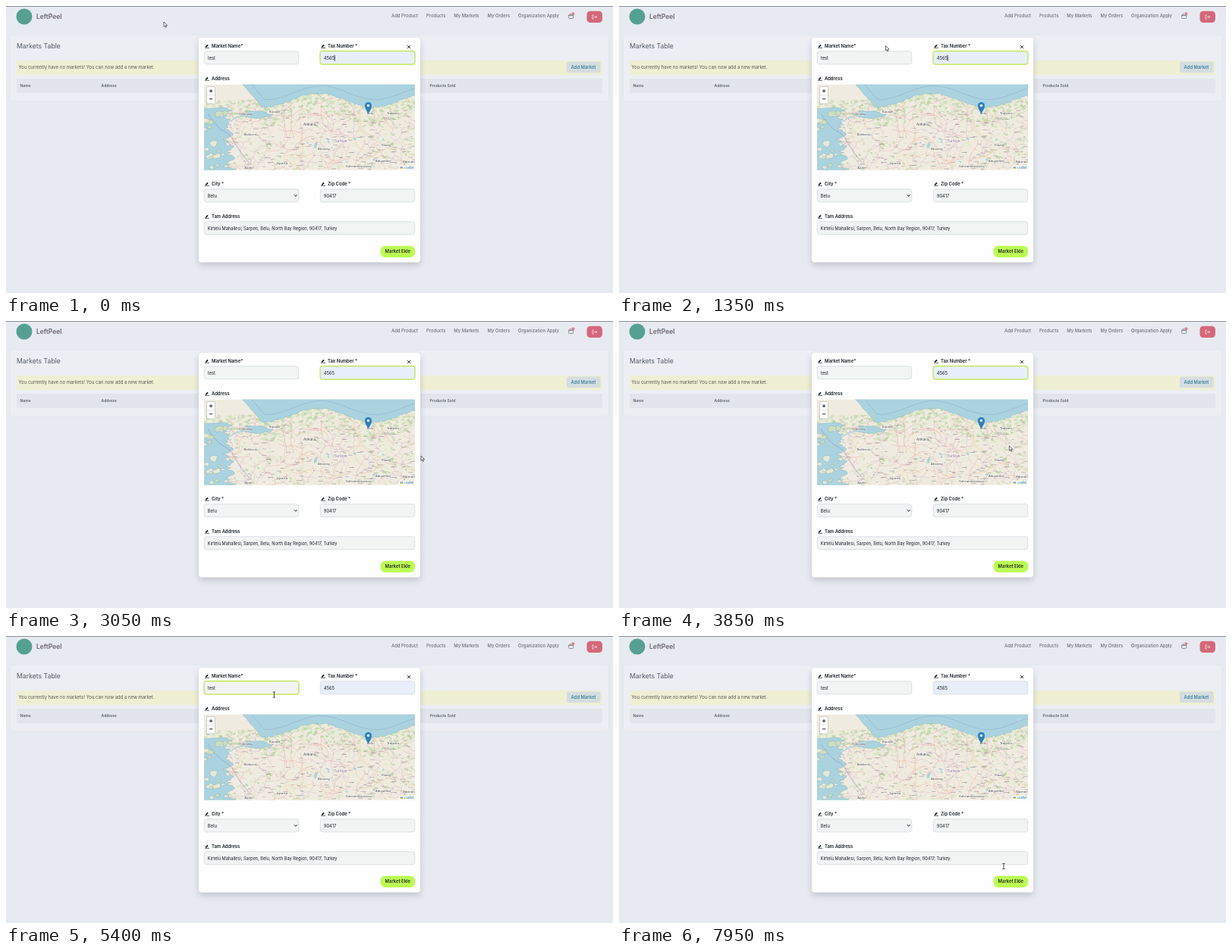
An HTML page with a canvas for the animation above (8000 ms loop, 800x379 px).

```html
<!DOCTYPE html>
<html lang="en">
<head>
<meta charset="utf-8">
<title>Markets Table</title>
<style>
html, body { margin: 0; width: 100%; height: 100%; overflow: hidden; background: #e8eaf1; }
canvas { display: block; width: 800px; height: 379px; }
</style>
</head>
<body>
<canvas id="stage"></canvas>
<script>
const W = 800, H = 379, LOOP = 8000;
const dpr = window.devicePixelRatio || 1;
const stage = document.getElementById('stage');
const page = document.createElement('canvas');
for (const cv of [stage, page]) { cv.width = W * dpr; cv.height = H * dpr; }
const view = stage.getContext('2d');
let c = page.getContext('2d');
c.scale(dpr, dpr);
view.scale(dpr, dpr);

const INK = '#1b1f25';
const LEFT = 261, RIGHT = 414, COL = 125, FULL = 278, FIELD_H = 17;
const form = [
  { name: 'Market Name*', x: LEFT, y: 53, w: COL, value: 'test' },
  { name: 'Tax Number *', x: RIGHT, y: 53, w: COL, value: '4565', fill: '#e8effb' },
  { name: 'City *', x: LEFT, y: 235, w: COL, value: 'Belu' },
  { name: 'Zip Code *', x: RIGHT, y: 235, w: COL, value: '90417' },
  { name: 'Tam Address', x: LEFT, y: 278, w: FULL, size: 5.65,
    value: 'Kirtelü Mahallesi, Sarpen, Belu, North Bay Region, 90417, Turkey' }
];
for (const f of form) f.top = f.y + 6.8;
const [nameField, taxField] = form;

let seed = 11;
const rnd = () => (seed = (seed * 16807) % 2147483647) / 2147483647;
const between = (a, b) => a + (b - a) * rnd();
const pick = list => list[Math.floor(rnd() * list.length)];
const times = (n, fn) => Array.from({ length: n }, (_, i) => fn(i));

function box(x, y, w, h, r, fill, line, width = 0.7) {
  c.beginPath();
  c.roundRect(x, y, w, h, r);
  if (fill) { c.fillStyle = fill; c.fill(); }
  if (line) { c.strokeStyle = line; c.lineWidth = width; c.stroke(); }
}

function oval(x, y, rx, ry, fill, turn = 0) {
  c.beginPath();
  c.ellipse(x, y, rx, ry, turn, 0, 7);
  c.fillStyle = fill;
  c.fill();
}

const dot = (x, y, r, fill) => oval(x, y, r, r, fill);

function text(s, x, base, size, color, weight = 400, align = 'left') {
  c.font = `${weight} ${size}px Inter, "Open Sans", sans-serif`;
  c.textAlign = align;
  c.fillStyle = color;
  c.fillText(s, x, base);
}

function path(pts, color, width, fill) {
  c.beginPath();
  for (const [x, y] of pts) c.lineTo(x, y);
  if (fill) { c.closePath(); c.fillStyle = fill; c.fill(); }
  if (color) { c.strokeStyle = color; c.lineWidth = width; c.stroke(); }
}

const seg = (x, y, dx, dy, color, width) => path([[x, y], [x + dx, y + dy]], color, width);

function shadowed(color, blur, dy, draw) {
  c.save();
  c.shadowColor = color;
  c.shadowBlur = blur * dpr;
  c.shadowOffsetY = dy * dpr;
  draw();
  c.restore();
}

function wander(x, y, angle, steps, len, bend) {
  return times(steps, () => {
    angle += between(-bend, bend);
    return [x += Math.cos(angle) * len, y += Math.sin(angle) * len];
  });
}

// Closed ragged outline around a centre.
const blob = (x, y, rx, ry, n, jag) => times(n, i => {
  const a = i / n * Math.PI * 2, d = between(1 - jag, 1 + jag);
  return [x + Math.cos(a) * rx * d, y + Math.sin(a) * ry * d];
});

const MAP = { x: 261, y: 103.5, w: 278, h: 113.3 };
const SEA = '#aad3df', SHORE = '#8bb3bd';
const coast = x => Math.min(124.5 + 9 * Math.cos((x - 340) / 72 * Math.PI), 103 + (x - 312) * 1.2);

function land() {
  c.fillStyle = '#f0ebe0';
  c.fillRect(MAP.x, MAP.y, MAP.w, MAP.h);
  const greens = ['#b9d8a2', '#cbe0b6', '#dbe7c9', '#add19e'];
  times(900, i => {
    const x = between(261, 539);
    const y = i % 2 ? coast(Math.max(x, 330)) + 24 * rnd() ** 1.5 : between(125, 217);
    const plateau = Math.hypot((x - 425) / 60, (y - 180) / 35) < 1;
    c.globalAlpha = between(0.3, 0.8) * (plateau ? 0.3 : 1);
    oval(x, y, between(0.6, 3.6), between(0.5, 1.8), pick(greens), between(-0.6, 0.6));
  });
  c.globalAlpha = 1;
}

function roads() {
  c.setLineDash([1.6, 0.8]);
  c.globalAlpha = 0.6;
  times(60, () => path(wander(between(265, 535), between(125, 215), between(0, 6.3), 9, 3.5, 0.9), '#b38abb', 0.6));
  c.setLineDash([]);
  times(95, () => {
    const angle = rnd() < 0.6 ? between(-0.4, 0.4) : between(1.1, 2);
    path(wander(between(258, 525), between(120, 217), angle, 10, 4, 0.6), pick(['#e2909d', '#ecba82', '#e6a3aa']), 0.6);
  });
  c.globalAlpha = 0.45;
  times(170, () => {
    c.fillStyle = pick(['#85698c', '#85698c', '#666']);
    c.fillRect(between(290, 535), between(137, 215), between(2, 7), 0.9);
  });
  c.globalAlpha = 1;
}

function seas() {
  const north = times(115, i => [312 + i * 2, coast(312 + i * 2) + between(-1, 1)]);
  path([...north, [542, 100], [310, 100]], SHORE, 0.5, SEA);
  path(north.map(([x]) => [x + 3, coast(x) - 10]), '#96abcf', 0.6);
  path(blob(329, 143.5, 19, 5, 20, 0.25), SHORE, 0.5, SEA);
  path(wander(311, 145, 2.5, 8, 3, 0.3), SEA, 1.4);
  const west = times(42, i => [290 + i / 6 + 4 * Math.sin(i * 0.8) + between(-4, 4), 134 + i * 2]);
  path([[258, 136], ...west, [258, 220]], SHORE, 0.5, SEA);
  times(20, () => {
    const r = between(1, 4);
    path(blob(between(262, 297), between(140, 216), r * 1.4, r, 9, 0.4), '#7fa5ad', 0.4, pick(['#e6e9d6', '#cfe0bd']));
  });
  path(wander(264, 138, 1.1, 20, 4.5, 0.25), '#8f8fc4', 0.6);
  times(7, () => oval(between(350, 500), between(175, 208), between(1, 3), between(0.7, 1.5), SEA, 0.3));
  oval(408, 184, 2, 4, SEA, 0.3);
}

function town(s, x, y, size = 4.3, color = '#444') {
  c.font = `400 ${size}px "Noto Sans", sans-serif`;
  c.textAlign = 'center';
  c.strokeStyle = 'rgba(255,255,255,.7)';
  c.lineWidth = 1;
  c.strokeText(s, x, y);
  c.fillStyle = color;
  c.fillText(s, x, y);
}

function mapLabels() {
  town('Tekirdağ', 316, 144);
  town('Kocaeli', 354, 141);
  town('Ankara', 400, 158, 4.8);
  town('Balıkesir', 322, 171);
  town('Türkiye', 441, 180, 5, '#8a6794');
  town('Aksaray', 419, 190);
  town('Isparta', 364, 209);
  town('Aydın', 320, 215);
  town('Kahramanmaraş', 465, 213);
  town('Adıyaman', 497, 206);
  town('Batman', 531, 207);
  town('Elazığ', 501, 185);
  town('Trabzon', 510, 143);
  town('Belu', 480, 143);
}

function pin(x, y) {
  c.beginPath();
  c.moveTo(x, y);
  c.quadraticCurveTo(x - 4.5, y - 6, x - 4.5, y - 10.5);
  c.arc(x, y - 10.5, 4.5, Math.PI, 0);
  c.quadraticCurveTo(x + 4.5, y - 6, x, y);
  c.fillStyle = '#2c7fc0';
  c.fill();
  dot(x, y - 10.5, 1.7, '#fff');
}

function drawMap() {
  c.save();
  c.beginPath();
  c.rect(MAP.x, MAP.y, MAP.w, MAP.h);
  c.clip();
  land();
  roads();
  seas();
  mapLabels();
  box(264.5, 106.5, 11, 22.5, 1.5, '#fff', '#b9bdbb');
  seg(264.5, 117.7, 11, 0, '#ccc', 0.5);
  for (const y of [112.2, 122.8]) seg(267.9, y, 4.4, 0, '#111', 0.9);
  seg(270.1, 110, 0, 4.4, '#111', 0.9);
  pin(477.5, 142);
  c.fillStyle = 'rgba(255,255,255,.82)';
  c.fillRect(517.5, 211, 22, 6);
  seg(519.3, 213.1, 4, 0, '#4c7be1', 1.3);
  seg(519.3, 214.4, 4, 0, '#e9cb3a', 1.3);
  text('Leaflet', 525, 215.4, 3.9, '#2277aa');
  c.restore();
}

function drawHeader() {
  c.fillStyle = '#e8eaf1';
  c.fillRect(0, 0, W, H);
  seg(0, 0.5, W, 0, '#8a8c96', 1);
  dot(24, 14, 10.5, '#55a092');
  text('LeftPeel', 40, 17, 8.5, '#6c6672', 600);
  let x = 729;
  for (const s of ['Organization Apply', 'My Orders', 'My Markets', 'Products', 'Add Product']) {
    text(s, x, 15.1, 5.9, '#6c717c', 500, 'right');
    x -= c.measureText(s).width + 11;
  }
  // basket
  const grey = '#666c78';
  box(741.7, 12.2, 6, 4.3, 1, null, grey);
  seg(741, 12.2, 7.5, 0, grey, 0.8);
  seg(742.8, 12, 1.6, -2.5, grey, 0.7);
  dot(747.4, 10.2, 2, '#d98391');
  // sign out
  box(765.5, 6.8, 20.4, 15.2, 4.5, '#d4687b');
  const pale = '#f3e4ea';
  path([[775, 12], [773, 12], [773, 17], [775, 17]], pale, 0.8);
  seg(774.7, 14.5, 4, 0, pale, 0.8);
  path([[777.1, 12.9], [778.8, 14.5], [777.1, 16.1]], pale, 0.8);
}

function drawTable() {
  shadowed('rgba(60,70,90,.06)', 2, 0, () => box(6, 39, 788, 86.5, 2, '#eceef4'));
  text('Markets Table', 14, 56, 8.7, '#555a65');
  box(14, 72, 772, 19, 1, '#eeefd3');
  text('You currently have no markets! You can now add a new market.', 16.5, 82.7, 5.97, '#575c55');
  box(739, 73.5, 44.5, 14.5, 2, '#d5dde0');
  text('Add Market', 744.6, 82.7, 5.85, '#3f87a2', 600);
  box(14, 96, 772, 19, 0, '#e2e5eb');
  for (const [s, x] of [['Name', 18.5], ['Address', 125.6], ['Products Sold', 558.6]])
    text(s, x, 107.3, 5, '#5a606a', 600);
}

function label(s, x, y) {
  seg(x + 2.2, y + 1.3, 2.9, -3, INK, 1.7);
  seg(x + 1, y + 2.3, 6, 0, INK, 0.7);
  text(s, x + 10, y + 2.1, 5.9, INK, 600);
}

function drawModal() {
  shadowed('rgba(40,50,70,.2)', 8, 4, () => box(254, 42, 292, 296.5, 4, '#fdfefd'));
  for (const f of form) {
    label(f.name, f.x, f.y);
    box(f.x + 0.3, f.top, f.w - 0.6, FIELD_H, 3, f.fill || '#f2f4f4', '#d0d5db');
    text(f.value, f.x + 4.8, f.top + 10.9, f.size || 5.8, INK);
  }
  label('Address', LEFT, 96);
  seg(529, 52, 4, 4, INK, 0.9);
  seg(533, 52, -4, 4, INK, 0.9);
  path([[379.8, 249.3], [381.7, 251.3], [383.6, 249.3]], INK, 1);
  box(493.5, 316.7, 45.7, 15.3, 6.5, '#bdfb55');
  text('Market Ekle', 516.3, 326.4, 5.9, '#24311a', 600, 'center');
  drawMap();
}

const clamp = v => Math.max(0, Math.min(1, v));
const CLICK = 4430, BLUR = 5700, FADE = 150, BLINK = 1060;

function ring(f, alpha) {
  c.globalAlpha = alpha;
  box(f.x, f.top - 0.3, f.w, FIELD_H + 0.6, 3.2, null, 'rgba(215,245,130,.5)', 2);
  box(f.x, f.top - 0.3, f.w, FIELD_H + 0.6, 3.2, null, '#bfe552', 0.9);
  c.globalAlpha = 1;
}

function caret(x, t) {
  if (t % BLINK < BLINK / 2) seg(x, 64.8, 0, 7.8, '#111', 0.8);
}

// Pointer rests: time, x, y.
const stops = [[0, 208, 21], [700, 239, 19], [2100, 491, 94], [3050, 547, 178], [3650, 545, 180],
  [4500, 326, 72], [5000, 330, 74], [6400, 448, 92], [7050, 470, 97], [7950, 507, 304]];

function pointer(t) {
  const i = Math.max(1, stops.findIndex(s => s[0] > t));
  const [t0, x0, y0] = stops[i - 1], [t1, x1, y1] = stops[i];
  const u = clamp((t - t0) / (t1 - t0)), e = u * u * (3 - 2 * u);
  return [x0 + (x1 - x0) * e, y0 + (y1 - y0) * e];
}

function drawPointer(x, y) {
  const typing = form.some(f => x > f.x && x < f.x + f.w && y > f.top - 2 && y < f.top + FIELD_H + 3);
  if (typing) {
    seg(x, y - 3.5, 0, 7, '#222', 0.8);
    for (const e of [-3.6, 3.6]) seg(x - 1.8, y + e, 3.6, 0, '#222', 0.7);
    return;
  }
  const arrow = [[0, 0], [0, 6.4], [1.5, 5.1], [2.5, 7.4], [3.5, 6.9], [2.5, 4.7], [4.5, 4.6], [0, 0]];
  path(arrow.map(([a, b]) => [x + a, y + b]), '#2b2b2e', 0.7, '#fff');
}

function frame(now) {
  const t = now % LOOP;
  c = view;
  c.drawImage(page, 0, 0, W, H);
  ring(taxField, 1 - clamp((t - CLICK) / FADE));
  ring(nameField, clamp((t - CLICK - 70) / FADE) * (1 - clamp((t - BLUR) / FADE)));
  if (t < CLICK) caret(433.2, t + 60);
  else if (t < BLUR) caret(276.6, t - CLICK);
  drawPointer(...pointer(Math.min(t, LOOP - 51)));
}

drawHeader();
drawTable();
drawModal();

let start;
function tick(now) {
  start ??= now;
  frame(now - start);
  requestAnimationFrame(tick);
}
frame(0);
requestAnimationFrame(tick);
</script>
</body>
</html>
```
